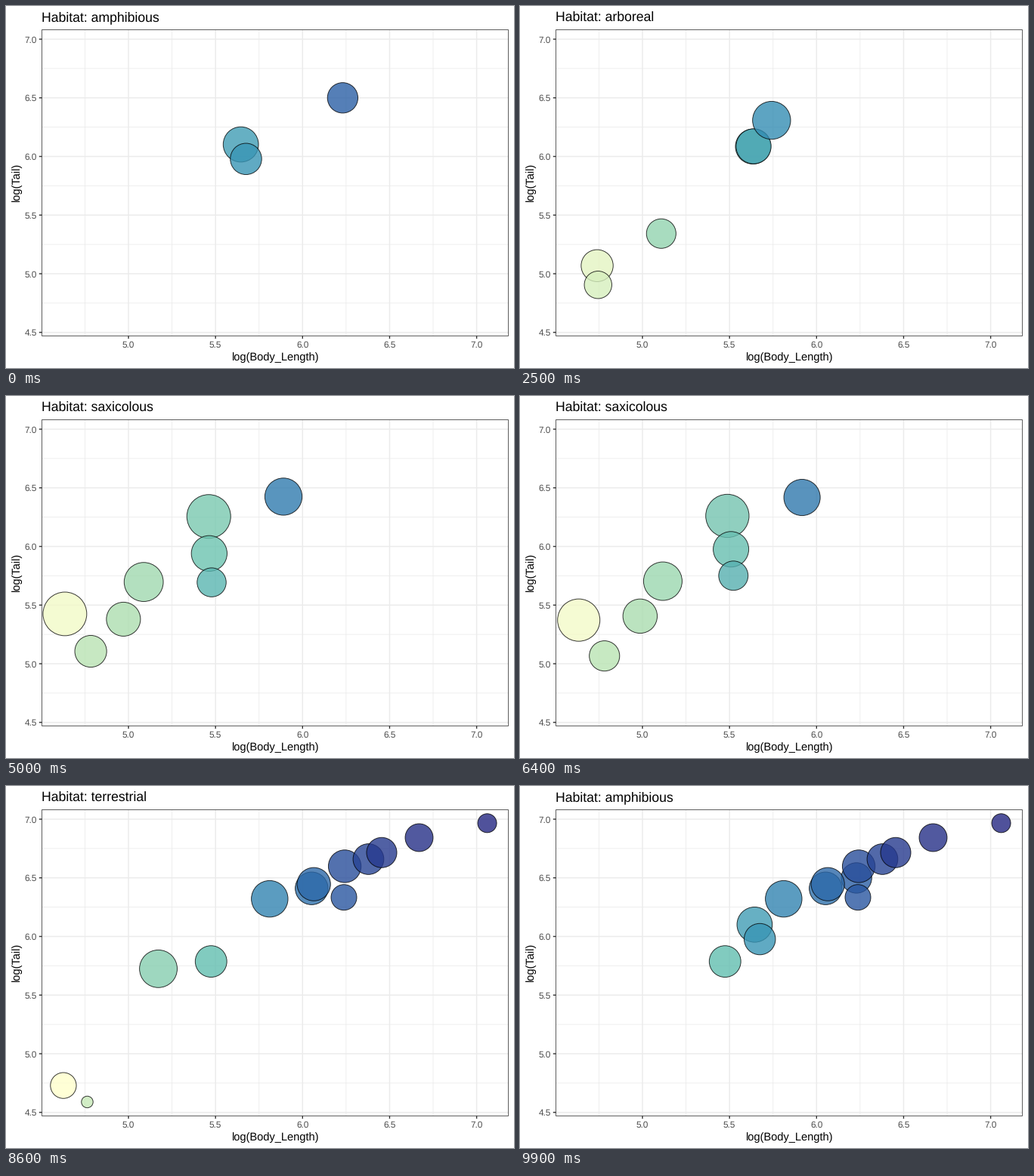
Recreate the animation shown at these times as a matplotlib script. Size 672 px wide and 480 px high, loop 10 s.

```python
import numpy as np
import matplotlib.pyplot as plt
from matplotlib.animation import FuncAnimation
from matplotlib.colors import LinearSegmentedColormap
from matplotlib.patches import Circle, Rectangle

plt.rcParams["font.family"] = "Liberation Sans"
plt.rcParams["text.hinting"] = "none"

W, H, DPI = 672, 480, 96
PX = 72 / DPI  # points per pixel
LEFT, RIGHT, TOP, BOTTOM = 47.5, 664.5, 31.5, 437.5
ALPHA = 0.8
CYCLE, HOLD = 25, 10  # frames per habitat, frames at rest

# Body length and tail length of each species, in mm
SPECIES = {
    "amphibious": [(283, 447), (291.5, 395), (508, 665)],
    "arboreal": [(114.4, 159), (115, 135), (165.3, 209), (280, 439),
                 (281, 440), (311.6, 549)],
    "saxicolous": [(103, 227), (119.5, 165), (144.2, 217), (162, 298),
                   (235.4, 521), (236, 380), (239.3, 297), (361.5, 617)],
    "terrestrial": [(102, 113), (117, 98.2), (176, 306), (238.5, 326),
                    (334, 556), (425, 608), (430.4, 630), (511.6, 563),
                    (514, 734), (589, 780), (635.6, 825), (788, 937),
                    (1165, 1060)],
}
NAMES = list(SPECIES)
SIZES = [len(s) for s in SPECIES.values()]
CMAP = LinearSegmentedColormap.from_list("pond", [
    "#FFFFCC", "#AEDFAF", "#65C1B0", "#3592B5", "#2A5EA5", "#242782"])


def x_px(v):
    return 162 + 230.3 * (v - 5)


def y_px(v):
    return 44 - 155.5 * (v - 7)


def bubble_rows():
    """One row per species: x, y, radius, red, green, blue."""
    body, tail = np.concatenate(list(SPECIES.values())).T
    ratio = tail / body
    radius = 7.7 + 21.3 * np.sqrt((ratio - ratio.min()) / np.ptp(ratio))
    rank = np.argsort(np.argsort(body)) / (len(body) - 1)
    rows = np.column_stack([x_px(np.log(body)), y_px(np.log(tail)), radius,
                            CMAP(rank)[:, :3]])
    return np.split(rows, np.cumsum(SIZES)[:-1])


ROWS = bubble_rows()


def cubic_in_out(t):
    return 4 * t ** 3 if t < .5 else 1 - 4 * (1 - t) ** 3


def pose(frame):
    """Return the habitat named in the title and the bubble rows."""
    k, step = divmod(frame, CYCLE)
    hold = HOLD if k else HOLD - 1
    t = max(0, step - hold) / (CYCLE - hold)
    if t == 0:
        return k, ROWS[k]
    nxt = (k + 1) % len(ROWS)
    n = min(SIZES[k], SIZES[nxt])
    rows = ROWS[k].copy()  # leaving bubbles stay until the end
    rows[:n] += (ROWS[nxt][:n] - rows[:n]) * cubic_in_out(t)
    return (nxt if t > .5 else k), rows


fig = plt.figure(figsize=(W / DPI, H / DPI), dpi=DPI, facecolor="white")
ax = fig.add_axes([0, 0, 1, 1])
ax.set_xlim(0, W)
ax.set_ylim(H, 0)
ax.axis("off")


def line(xs, ys, width, colour, z):
    ax.plot(xs, ys, lw=width * PX, color=colour, zorder=z, snap=False,
            solid_capstyle="butt")


def grid(x_vals, y_vals, width, z):
    for v in x_vals:
        line([x_px(v)] * 2, [TOP, BOTTOM], width, "#EBEBEB", z)
    for v in y_vals:
        line([LEFT, RIGHT], [y_px(v)] * 2, width, "#EBEBEB", z)


def label(x, y, text, size, colour="black", **kw):
    return ax.text(x, y, text, fontsize=size, color=colour, va="baseline", **kw)


x_ticks = np.arange(5, 7.1, .5)
y_ticks = np.arange(4.5, 7.1, .5)
minor = np.arange(4.75, 7, .5)
grid(minor, minor, .8, 0)
grid(x_ticks, y_ticks, 1.42, 1)

for v in x_ticks:
    line([x_px(v)] * 2, [BOTTOM, BOTTOM + 3.67], 1.42, "#333333", 1)
    label(x_px(v), 452.7, f"{v:.1f}", 8.8, "#4D4D4D", ha="center")
for v in y_ticks:
    line([LEFT - 3.67, LEFT], [y_px(v)] * 2, 1.42, "#333333", 1)
    label(40.7, y_px(v) + 4.4, f"{v:.1f}", 8.8, "#4D4D4D", ha="right")

label(355.7, 469.5, "log(Body_Length)", 11, ha="center")
label(17.8, 234.3, "log(Tail)", 11, ha="center", rotation=90,
      rotation_mode="anchor")
title = label(46.7, 20, "", 13.2)

panel = Rectangle((LEFT, TOP), RIGHT - LEFT, BOTTOM - TOP, fill=False,
                  ec="#333333", lw=.78 * PX, zorder=5, snap=False)
ax.add_patch(panel)

circles = [Circle((0, 0), 1, ec=(0, 0, 0, ALPHA), lw=.95 * PX, zorder=3)
           for _ in range(max(SIZES))]
for c in circles:
    ax.add_patch(c)
    c.set_clip_path(panel)


def update(frame):
    state, rows = pose(frame)
    title.set_text(f"Habitat: {NAMES[state]}")
    for i, c in enumerate(circles):
        c.set_visible(i < len(rows))
        if i < len(rows):
            c.center = rows[i, :2]
            c.radius = rows[i, 2]
            c.set_facecolor((*rows[i, 3:], ALPHA))
    return [title, *circles]


anim = FuncAnimation(fig, update, frames=len(ROWS) * CYCLE, interval=100,
                     repeat=True)
plt.show()
```
